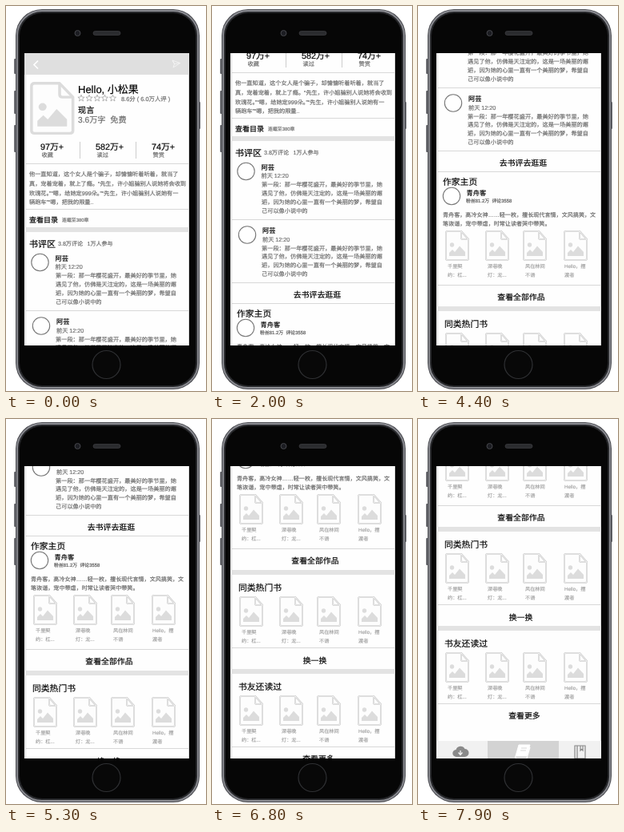
These frames come from a looping animation (250x482 px, 8000 ms). An HTML page:

```html
<!DOCTYPE html>
<html lang="zh-CN">
<head>
<meta charset="utf-8">
<title>Book page scrolling on a phone</title>
<style>
html, body { margin: 0; width: 100%; height: 100%; overflow: hidden; background: #fff; }
svg { display: block; }
text {
  font-family: "Liberation Sans", "Noto Sans CJK SC", "Noto Sans CJK", sans-serif;
  text-rendering: geometricPrecision;
  stroke-width: .18px;
}
</style>
</head>
<body>
<svg width="250" height="482" viewBox="0 0 250 482">
  <defs>
    <clipPath id="screen"><rect x="23" y="59" width="206" height="366"/></clipPath>
    <g id="doc" stroke-linejoin="round">
      <path d="M3 1H20L29 11V35Q29 37 27 37H3Q1 37 1 35V3Q1 1 3 1Z" fill="#fdfdfd"/>
      <path d="M20 1V9Q20 11 22 11H29" fill="none"/>
      <g fill="#dcdcdc" stroke="none">
        <circle cx="8.500" cy="18" r="2.700"/>
        <path d="M5 32V28L9 24 12 27 18 19.500 25 27V32Z"/>
      </g>
    </g>
    <g id="thin-doc">
      <use href="#doc" stroke="#c9c9c9" stroke-width="2"/>
      <path d="M3 1H20L29 11V35Q29 37 27 37H3Q1 37 1 35V3Q1 1 3 1ZM20 1V9Q20 11 22 11H29"
        fill="none" stroke="#fdfdfd" stroke-width=".8"/>
    </g>
  </defs>
  <g fill="#6b6c71">
    <rect x="10" y="66" width="4" height="19" rx="1"/>
    <rect x="10" y="106" width="4" height="29" rx="1"/>
    <rect x="10" y="149" width="4" height="34" rx="1"/>
    <rect x="239" y="120" width="4" height="34" rx="1"/>
  </g>
  <rect x="12" y="4" width="230" height="476" rx="33" fill="#4b4c51"/>
  <rect x="14" y="6" width="226" height="472" rx="31" fill="#2c2d30" stroke="#8b8c92" stroke-width="1.800"/>
  <rect x="16.500" y="8.500" width="221" height="467" rx="29" fill="#060606" stroke="#222326"/>
  <circle cx="89.500" cy="34" r="3.500" fill="#1c1d22" stroke="#46474c"/>
  <rect x="109" y="31.500" width="34" height="5" rx="2.500" fill="#2b2c2f" stroke="#3f4044" stroke-width=".7"/>
  <circle cx="125.500" cy="449" r="17.500" fill="#080808" stroke="#2f3033" stroke-width="1.200"/>
  <g clip-path="url(#screen)">
    <rect x="23" y="59" width="206" height="366" fill="#fefefe"/>
    <g id="page"></g>
  </g>
</svg>
<script>
const GRAY = '#6c6c6c', PALE = '#a4a4a4', RULE = '#d8d8d8';
const page = document.getElementById('page');

// y is the vertical middle of the line
const text = (x, y, size, str, color = '#000', anchor = 'start') =>
  `<text x="${x}" y="${y + size * .37}" font-size="${size}" fill="${color}" stroke="${color}" text-anchor="${anchor}">${str}</text>`;
const lines = (x, y, size, gap, rows, color = GRAY) =>
  rows.map((row, i) => text(x, y + i * gap, size, row, color)).join('');
const rect = (x, y, w, h, fill) => `<rect x="${x}" y="${y}" width="${w}" height="${h}" fill="${fill}"/>`;
const rule = y => rect(24, y, 204, 1, RULE);
const band = y => rect(24, y, 205, 6, '#e3e3e3');
const button = (x, y, label) => text(x, y, 9.9, label, '#000', 'middle');
const avatar = (x, y) => `<circle cx="${x}" cy="${y}" r="10.7" fill="#fff" stroke="#777" stroke-width="1.1"/>`;
const path = (d, stroke, width = 1, fill = 'none') =>
  `<path d="${d}" stroke="${stroke}" stroke-width="${width}" fill="${fill}"/>`;

const star = x => {
  const points = Array.from({ length: 10 }, (_, i) => {
    const r = i % 2 ? 1.8 : 4.3, a = i * Math.PI / 5;
    return `${x + r * Math.sin(a)},${115.5 - r * Math.cos(a)}`;
  });
  return `<polygon points="${points.join(' ')}" fill="#fff" stroke="#999" stroke-width=".7"/>`;
};

const stat = (x, count, label) => text(x, 176, 10.8, count) + text(x + 1.5, 186.5, 7.2, label, GRAY);

const review = (x, y) => avatar(x - 19, y + 5.5) + text(x, y, 8.2, '阿芸') +
  text(x, y + 11, 7.2, '前天 12:20', GRAY) +
  lines(62, y + 22, 7.2, 10.8, [
    '第一段：那一年樱花盛开，最美好的季节里，她',
    '遇见了他，仿佛是天注定的，这是一场美丽的邂',
    '逅，因为她的心里一直有一个美丽的梦，希望自',
    '己可以像小说中的']);

const books = [
  [34, '千里契', '约：杠...'], [84, '深巷晚', '灯：龙...'],
  [131, '风在林间', '不语'], [182, 'Hello，摆', '渡者']];
const shelf = y => books.map(([x, ...title], i) =>
  `<use href="#thin-doc" x="${x}" y="${y}"/>` +
  lines(i < 3 ? x + 3 : x + 1, y + 45, 6.2, 10.8, title, PALE)).join('');

page.innerHTML = [
  // header
  rect(23, 59, 206, 27, '#dfdfdf'),
  path('M40 68.500L35 73.500L40 78.500', '#fff', 1.6),
  path('M208 68L217.500 71.500L209 77L210.500 72.500ZL210.500 72.500L217.500 71.500', '#f4f4f4', .9),
  rect(24, 86, 1, 860, RULE), rect(228, 86, 1, 860, RULE),

  // book summary
  '<use href="#doc" transform="translate(30 95) scale(1.85 1.74)" stroke="#dcdcdc" stroke-width="1.9"/>',
  text(90, 104, 13, 'Hello, 小松果'),
  [94, 104, 114, 123.5, 133.5].map(star).join(''),
  text(144, 116, 7.4, '8.6分 ( 6.0万人评 )', GRAY),
  text(90, 130, 10.2, '现言'),
  text(90, 142.5, 10.2, '3.6万字&#160; 免费', GRAY),
  stat(43, '97万+', '收藏'), stat(112, '582万+', '读过'), stat(182, '74万+', '赞赏'),
  rect(92, 170, 1, 21, '#ccc'), rect(162, 170, 1, 21, '#ccc'),
  rule(197),
  lines(29, 210.5, 7.18, 11.7, [
    '他一直知道，这个女人是个骗子，却慵慵听着听着，就当了',
    '真，宠着宠着，就上了瘾。“先生，许小姐骗别人说她将会收到',
    '玫瑰花。”“嗯，给她定999朵。”“先生，许小姐骗别人说她有一',
    '辆跑车”“嗯，把我的限量..']),
  rule(254),
  text(29, 268, 9, '查看目录'), text(70, 268, 5.9, '连载至380章', GRAY),
  band(277),

  // reviews
  text(29, 298, 11, '书评区'),
  text(65, 297, 7.1, '3.8万评论', GRAY), text(101.5, 297, 7, '1万人参与', GRAY),
  review(61.5, 315.5), rule(381), review(63, 395), rule(460),
  button(131.5, 475, '去书评去逛逛'), rule(486),

  // author
  text(31, 499, 10.8, '作家主页'),
  avatar(42, 517), text(60.5, 513, 8.2, '青舟客'),
  text(60, 522.5, 5.9, '粉丝81.2万&#160; 评论3558', '#555'),
  lines(31, 540, 7.08, 11, [
    '青舟客，高冷女神……轻一枚，擅长现代言情，文风搞笑，文',
    '笔诙谐，宠中带虐，时常让读者哭中带笑。'], '#666'),
  shelf(560), rule(628), button(129, 643, '查看全部作品'), band(655),

  // similar books
  text(33, 677, 10.8, '同类热门书'),
  shelf(688), rule(752), button(128.5, 768, '换一换'), band(779),
  text(33, 801, 10.8, '书友还读过'),
  shelf(812), rule(876), button(133, 891.5, '查看更多'),

  // tab bar
  rect(24, 923, 205, 42, '#f1f1f1'), rect(87, 923, 89, 42, '#d3d3d3'),
  path('M48 943a4.500 4.500 0 0 1-.5-9a6 6 0 0 1 11-1a5 5 0 0 1 0 10Z', 'none', 0, '#8a8a8a'),
  path('M53 935v5m-2.500-2.500l2.500 3l2.500-3', '#f1f1f1', 1.3),
  path('M126 928h14l-4 14h-14Z', '#fff', 1, '#fff'),
  path('M129 932h7m-8 3h7', '#d3d3d3', .9),
  path('M122 942q-1 3 2 3h12l4-14', '#fff', 1.1),
  path('M196 929h13v16h-13Zm3 0v16m4-16v6l1.500-1.500l1.500 1.500v-6', '#888', 1.2),
].join('');

// wheel notches: start ms, steps of 100 ms, distance, easing power
const LOOP = 8000, STEP = 100;
const notches = [
  [1300, 3, 38, 2], [1800, 1, 38, 1], [2000, 1, 38, 1],
  [2600, 2, 44, 2], [2900, 3, 45, 2],
  [3700, 3, 38, 2], [4200, 3, 38, 2],
  [4600, 2, 39, 2], [5300, 3, 40, 2], [5700, 2, 39, 2],
  [6500, 1, 38, 1], [6700, 2, 31, 1], [6900, 7, 40, 1], [7700, 3, 14, 2]];

const scrollAt = t => notches.reduce((sum, [start, steps, distance, power]) => {
  const done = Math.floor((t - start) / STEP) + 1;
  const p = Math.min(Math.max(done / steps, 0), 1);
  return sum + distance * (1 - (1 - p) ** power);
}, 0);

function draw() {
  const y = Math.round(scrollAt(performance.now() % LOOP));
  page.setAttribute('transform', `translate(0 ${-y})`);
  requestAnimationFrame(draw);
}
draw();
</script>
</body>
</html>
```
